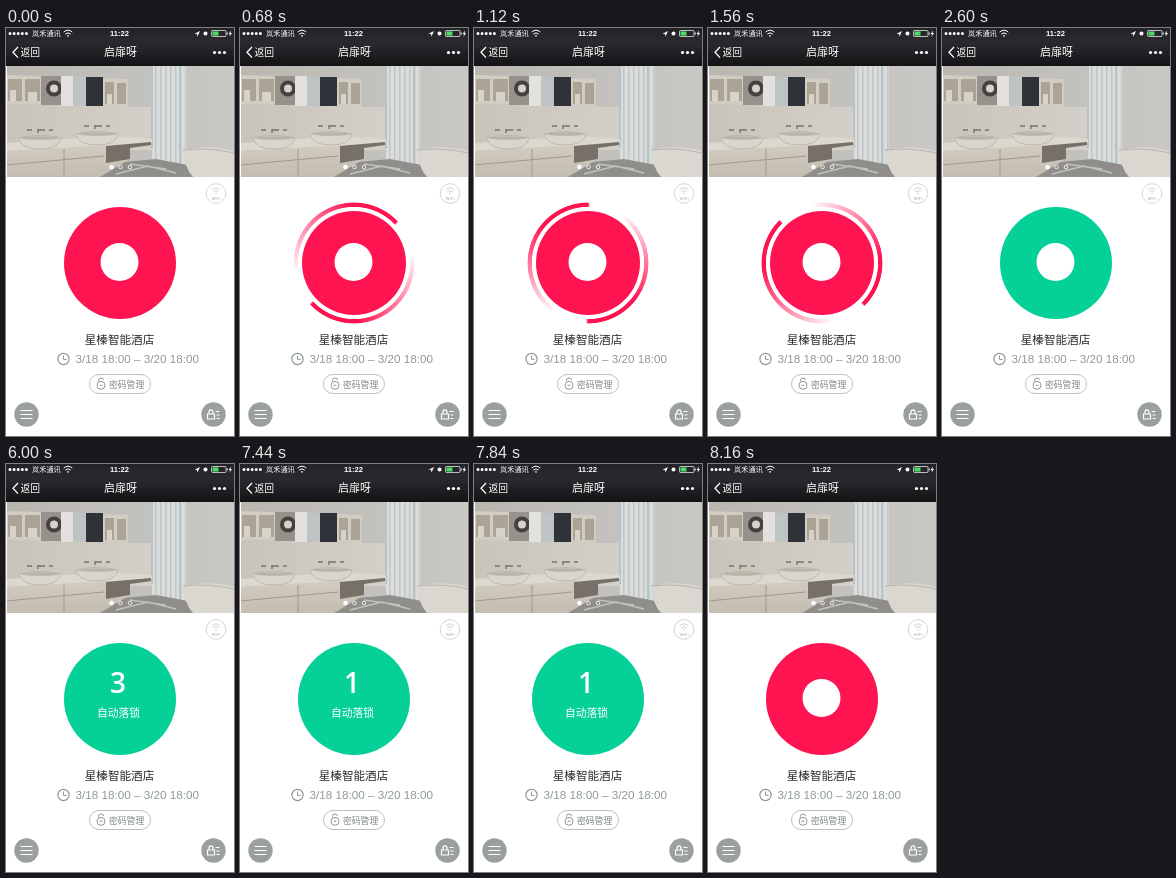
An HTML page for the animation above (8.2 s loop, 228x408 px).

```html
<!DOCTYPE html>
<html lang="zh-CN">
<head>
<meta charset="utf-8">
<style>
  html, body { margin: 0; width: 100%; height: 100%; overflow: hidden; background: #fff; }
  #stage { position: relative; width: 228px; height: 408px; overflow: hidden; }
  svg { position: absolute; left: 0; top: 0; }
  text { font-family: "Noto Sans CJK SC", "Noto Sans CJK", sans-serif; }
  .mid { text-anchor: middle; }
  .latin { font-family: "Liberation Sans", sans-serif; }
  #ring {
    position: absolute; left: 53px; top: 174px; width: 122px; height: 122px;
    background: repeating-conic-gradient(#ff1452 0, transparent 2deg 35deg, #ff1452 130deg 180deg);
    -webkit-mask: radial-gradient(closest-side, transparent 55.7px, #000 56.5px 60px, transparent 60.8px);
    mask: radial-gradient(closest-side, transparent 55.7px, #000 56.5px 60px, transparent 60.8px);
  }
</style>
</head>
<body>
<div id="stage">
<svg width="228" height="408" viewBox="0 0 228 408">
  <defs>
    <linearGradient id="bar" x2="0" y2="1"><stop stop-color="#222228"/><stop offset=".4" stop-color="#2a2a2e"/><stop offset="1" stop-color="#131316"/></linearGradient>
    <linearGradient id="wall"><stop stop-color="#bab7b1"/><stop offset="1" stop-color="#c9c8c5"/></linearGradient>
    <linearGradient id="tiles"><stop stop-color="#c9c4b9"/><stop offset="1" stop-color="#d3d0c9"/></linearGradient>
    <linearGradient id="counter" x2="0" y2="1"><stop stop-color="#d2ccc1"/><stop offset="1" stop-color="#c3bcb0"/></linearGradient>
    <clipPath id="photoClip"><path d="M1 38H228V149H1z"/></clipPath>
    <g id="wifi" fill="none" stroke-linecap="round">
      <path d="M-4-2Q0-5.5 4-2M-2.4 0Q0-2.2 2.4 0"/><path d="M0 2v.1" stroke-width="1.6"/>
    </g>
    <g id="basin">
      <path fill="#d9d5cc" stroke="#aca69b" stroke-width=".6" d="M0 0Q21-5 42 0Q40 11 21 11Q2 11 0 0z"/>
      <ellipse cx="21" cy="0" rx="19" ry="1.8" fill="#b9b3a8"/>
      <path fill="none" stroke="#77736d" stroke-width="1.4" d="M8-8H13M19-9V-5M19-8H26M30-8H34"/>
    </g>
  </defs>

  <!-- Bathroom banner -->
  <g clip-path="url(#photoClip)">
    <path fill="url(#wall)" d="M0 38H228V149H0z"/>
    <path fill="url(#tiles)" d="M0 76L122 79H146V122H0z"/>
    <path fill="#d2cdc2" d="M0 47L122 51V79L0 76z"/>
    <path fill="#aaa396" d="M2 51H16V73H2zM19 51H34V73H19zM99 54H108V76H99zM111 55H120V76H111z"/>
    <path fill="#d8d3c8" d="M4 62H10V73H4zM22 64H31V73H22zM101 66H106V76H101z"/>
    <path fill="#96918a" d="M35 48H55V77H35z"/>
    <circle cx="48" cy="60.5" r="6" fill="#d5d2cc" stroke="#44413f" stroke-width="4"/>
    <path fill="#e2e1dd" d="M55 48H67V78H55z"/>
    <path fill="#bec3c4" d="M67 49H80V78H67z"/>
    <path fill="#303239" d="M80 49H97V78H80z"/>
    <path fill="#d9dddc" d="M146 38H181V138H146z"/>
    <g id="curtain"></g>
    <path fill="#b4c4c9" d="M145 38h2v82h-2zM173 38h2v98h-2z"/>
    <path fill="#8f8e8b" d="M88 149L118 134L150 131L182 137L190 149z"/>
    <path fill="none" stroke="#c3c1bc" stroke-width="1.6" d="M110 146L142 138L170 145M124 136L160 141"/>
    <path fill="#dad7d0" d="M177 122Q203 116 228 123V149H187Q178 139 177 122z"/>
    <path fill="none" stroke="#b8b4ac" d="M177 122Q203 119 228 125"/>
    <path fill="#ddd8ce" d="M0 115L104 108L146 111V115L0 123z"/>
    <path fill="url(#counter)" d="M0 123L124 116V131L94 149H0z"/>
    <path fill="#777069" d="M100 118L145 114V117L124 120V131L100 135z"/>
    <path fill="none" stroke="#9f988c" d="M0 137L98 128M58 121V149"/>
    <use href="#basin" x="13" y="110"/>
    <use href="#basin" x="70" y="106"/>
    <g stroke="#fff" stroke-width=".8" fill="none">
      <circle cx="105.5" cy="139" r="1.9" fill="#fff"/><circle cx="114.5" cy="139" r="1.8"/><circle cx="124" cy="139" r="1.8"/>
    </g>
  </g>

  <!-- Status and navigation bars -->
  <path fill="url(#bar)" d="M0 0H228V38H0z"/>
  <g fill="#fff">
    <path d="M4 5.5H21" stroke="#fff" stroke-width="3" stroke-linecap="round" stroke-dasharray="0 4.1"/>
    <text x="26" y="8.3" font-size="7.2">岚禾通讯</text>
    <use href="#wifi" x="62" y="5.8" stroke="#fff" stroke-width="1"/>
    <text x="113.5" y="8.3" font-size="7.6" font-weight="700" class="mid latin">11:22</text>
    <path d="M188.5 5.8L194 3L191.5 8.5L191 6z"/>
    <circle cx="199.5" cy="5.5" r="2"/>
    <rect x="205.5" y="2.5" width="14.5" height="6" rx="1" fill="none" stroke="#fff" stroke-width=".7"/>
    <path fill="#4cd964" d="M206.5 3.4H212.5V7.6H206.5z"/>
    <path d="M220.7 4.4H221.7V6.6H220.7zM225 2.5L222.6 6H224L223.4 8.7L226 5H224.5z"/>
    <path d="M12 19L7 24.3L12 29.6" fill="none" stroke="#fff" stroke-width="1.3"/>
    <text x="14.5" y="28" font-size="9.8">返回</text>
    <text x="114.5" y="28" font-size="11" class="mid">启扉呀</text>
    <circle cx="208.5" cy="24.5" r="1.6"/><circle cx="213.5" cy="24.5" r="1.6"/><circle cx="218.5" cy="24.5" r="1.6"/>
  </g>

  <!-- Page details -->
  <g fill="none" stroke="#cdd1d1">
    <circle cx="210" cy="165.5" r="9.8" stroke-width=".9"/>
    <use href="#wifi" x="210" y="163.5" stroke-width="1"/>
  </g>
  <text x="210" y="171.5" font-size="4.4" font-weight="700" fill="#c2c6c6" class="mid latin">WiFi</text>
  <text x="113.5" y="316" font-size="11.6" font-weight="500" fill="#2c2c2c" class="mid">星榛智能酒店</text>
  <g fill="none" stroke="#8f9899">
    <circle cx="57.5" cy="331" r="5.6" stroke-width="1.2"/><path d="M57.5 327.5V331.4H60.7"/>
    <rect x="83.5" y="346.5" width="61" height="19" rx="9.5" stroke="#b3bab9" stroke-width=".9"/>
    <circle cx="95" cy="357.3" r="4"/><path d="M92.4 353.4V352.5Q92.4 350 95 350T97.6 352M93.5 357.3H96.5"/>
  </g>
  <text x="69.5" y="335.2" font-size="11.7" fill="#8f9899" class="latin">3/18 18:00 – 3/20 18:00</text>
  <text x="103" y="359.9" font-size="8.8" fill="#7d8687">密码管理</text>
  <g fill="#9a9fa0"><circle cx="20.5" cy="386.5" r="12.2"/><circle cx="207.5" cy="386.5" r="12.2"/></g>
  <g fill="none" stroke="#fff" stroke-width="1.2">
    <path d="M14.5 382.5H26.5M14.5 386.5H26.5M14.5 390.5H26.5"/>
    <path d="M201.5 386H208.5V391H201.5zM203 386V384Q203 381.8 205 381.8T207 384V386M209.5 383.5H213.5M210.5 387H213.5M210.5 390.5H213.5"/>
  </g>

  <!-- Unlock button -->
  <circle id="disc" cx="114" cy="235" r="56"/>
  <circle id="mark" cx="113.5" cy="234" r="19" fill="#fff"/>
  <g id="countdown" fill="#fff">
    <text id="digit" x="112" y="229" font-size="28" font-weight="600" class="mid" style="font-family:'Open Sans',sans-serif"></text>
    <text x="112.5" y="252.5" font-size="10.8" font-weight="500" class="mid">自动落锁</text>
  </g>
</svg>
<div id="ring"></div>
</div>
<script>
const LOOP = 8200, STEP = 40, TURN = 1180;
const RED = [255, 20, 82], GREEN = [5, 208, 151];
const $ = id => document.getElementById(id);
const disc = $('disc'), mark = $('mark'), countdown = $('countdown'), digit = $('digit'), ring = $('ring');
const ramp = (t, from, to) => Math.min(1, Math.max(0, (t - from) / (to - from)));

let folds = '';
for (let x = 149; x < 180; x += 5) {
  folds += `<path d="M${x} 38h1.5v98h-1.5z" fill="#c3c6c4"/>`;
}
$('curtain').innerHTML = folds;

function draw(time) {
  const t = Math.floor(time % LOOP / STEP) * STEP;

  const spin = ramp(t, 0, 200) * (1 - ramp(t, 1560, 1720));
  ring.style.opacity = spin;
  ring.style.transform = `rotate(${(t - 1120) / TURN * 360}deg)`;
  disc.setAttribute('r', 56 - 4 * spin);

  const reset = ramp(t, 8000, 8160);
  const open = ramp(t, 1680, 1840) * (1 - reset);
  disc.setAttribute('fill', `rgb(${RED.map((c, i) => c + (GREEN[i] - c) * open)})`);

  const counting = ramp(t, 2600, 2880) * (1 - reset);
  mark.setAttribute('opacity', 1 - counting);
  countdown.setAttribute('opacity', counting);
  digit.textContent = 8 - Math.floor((t - 480) / 960);
}

const start = performance.now();
function tick() {
  draw(performance.now() - start);
  requestAnimationFrame(tick);
}
tick();
</script>
</body>
</html>
```
